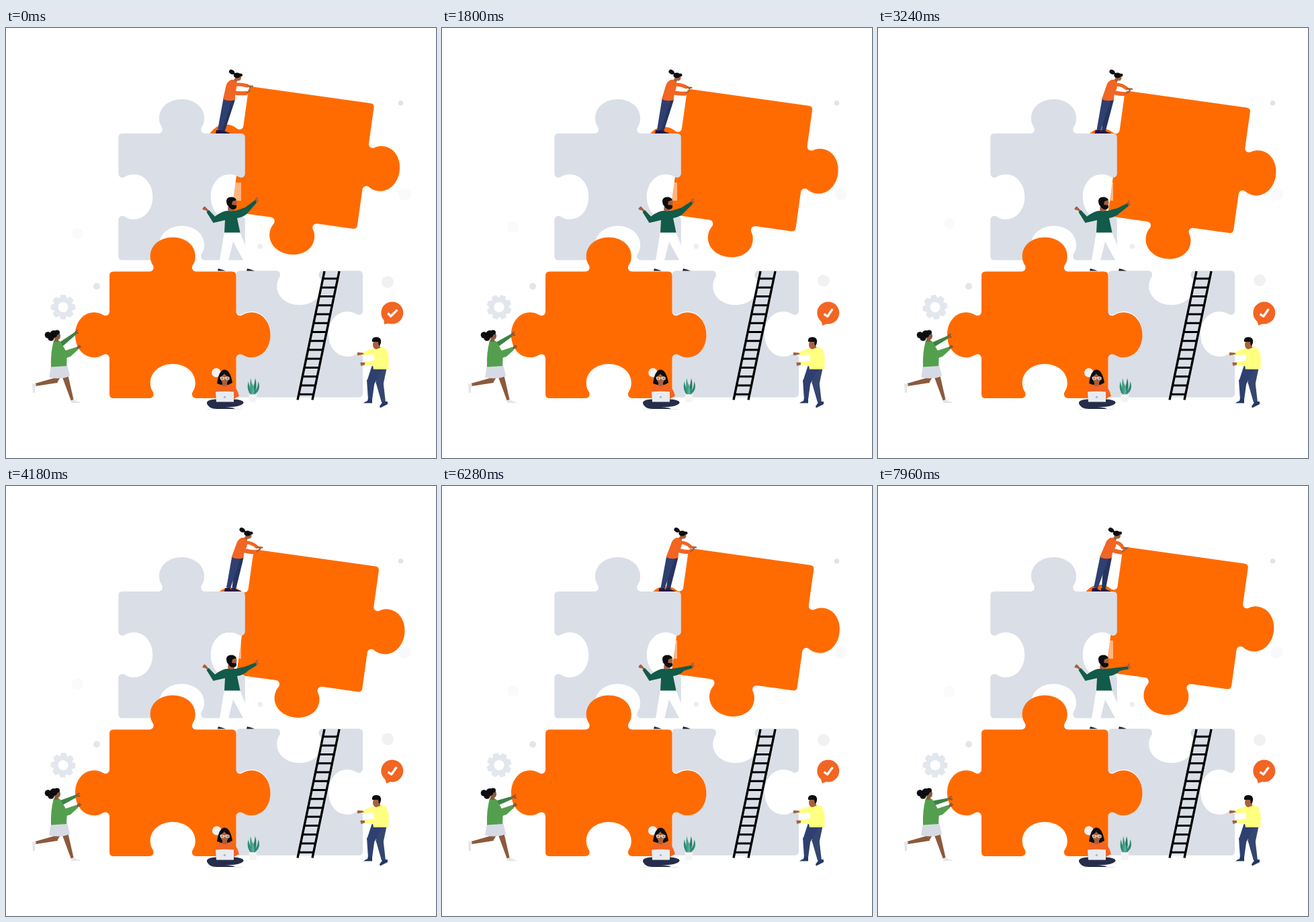
These frames come from a looping animation (640x640 px, 8 s). An HTML page with a canvas:

```html
<!DOCTYPE html>
<html lang="en">
<head>
<meta charset="utf-8">
<title>Puzzle team</title>
<style>
html, body { margin: 0; width: 100%; height: 100%; overflow: hidden; background: #fff; }
canvas { display: block; width: 100vmin; height: 100vmin; }
</style>
</head>
<body>
<canvas id="stage" width="640" height="640"></canvas>
<script>
const ctx = document.getElementById('stage').getContext('2d');
const LOOP = 8000;
const TIMES = [0, 680, 1800, 3240, 4400, 5160, 6280, 7960];
const ORANGE = '#ff6b00', GREY = '#dadee7', CORAL = '#f26522';
const NAVY = '#2f4070', DARK = '#1d2347', HAIR = '#0d0d10';
const SKIN = '#a5613e', BROWN = '#8b5a3c';

// Smooth curve through the values at TIMES
function at(t, values) {
  const last = TIMES.length - 1;
  let i = 0;
  while (i < last - 1 && t >= TIMES[i + 1]) i++;
  const slope = k => {
    const a = Math.max(k - 1, 0), b = Math.min(k + 1, last);
    return (values[b] - values[a]) / (TIMES[b] - TIMES[a]);
  };
  const span = TIMES[i + 1] - TIMES[i], u = (t - TIMES[i]) / span;
  const u2 = u * u, u3 = u2 * u;
  return (2 * u3 - 3 * u2 + 1) * values[i] + (3 * u2 - 2 * u3) * values[i + 1]
    + span * ((u3 - 2 * u2 + u) * slope(i) + (u3 - u2) * slope(i + 1));
}

function shape(color, path) {
  ctx.fillStyle = color;
  ctx.fill(new Path2D(path));
}

function oval(color, x, y, rx, ry = rx, turn = 0) {
  ctx.fillStyle = color;
  ctx.beginPath();
  ctx.ellipse(x, y, rx, ry, turn, 0, 7);
  ctx.fill();
}

function line(color, width, path, cap = 'round') {
  ctx.strokeStyle = color;
  ctx.lineWidth = width;
  ctx.lineCap = cap;
  ctx.lineJoin = 'round';
  ctx.stroke(new Path2D(path));
}

// Tapered limb between two points
function limb(color, x1, y1, w1, x2, y2, w2) {
  const len = Math.hypot(x2 - x1, y2 - y1);
  const nx = (y1 - y2) / len / 2, ny = (x2 - x1) / len / 2;
  shape(color, `M${x1 + nx * w1},${y1 + ny * w1}L${x2 + nx * w2},${y2 + ny * w2}
    L${x2 - nx * w2},${y2 - ny * w2}L${x1 - nx * w1},${y1 - ny * w1}Z`);
}

// Sides run top, right, bottom, left: 1 tab, -1 socket, 0 flat
function piece(color, x, y, sides, angle = 0) {
  const size = 188.5, c = size / 2, r = 6;
  ctx.save();
  ctx.translate(x, y);
  ctx.rotate(angle);
  ctx.beginPath();
  for (const s of sides) {
    ctx.lineTo(r, 0);
    if (s) {
      ctx.lineTo(c - 35, 0);
      ctx.bezierCurveTo(c - 29, 0, c - 27, -6 * s, c - 30, -10 * s);
      ctx.bezierCurveTo(c - 33, -15 * s, c - 33.5, -19 * s, c - 33.5, -23 * s);
      ctx.bezierCurveTo(c - 33.5, -39 * s, c - 19, -51 * s, c, -51 * s);
      ctx.bezierCurveTo(c + 19, -51 * s, c + 33.5, -39 * s, c + 33.5, -23 * s);
      ctx.bezierCurveTo(c + 33.5, -19 * s, c + 33, -15 * s, c + 30, -10 * s);
      ctx.bezierCurveTo(c + 27, -6 * s, c + 29, 0, c + 35, 0);
    }
    ctx.lineTo(size - r, 0);
    ctx.quadraticCurveTo(size, 0, size, r);
    ctx.translate(size, 0);
    ctx.rotate(Math.PI / 2);
  }
  ctx.fillStyle = color;
  ctx.fill();
  ctx.restore();
}

function dots(t) {
  oval('#e2e3e6', 587.5, 111.7, 3.7);
  oval('#f8f9fb', 593.5, 248, 9);
  oval('#eceef0', 378.3, 325, 3.8);
  oval('#f9fafb', 106, at(t, [306, 302, 296.5, 291, 296, 301, 305, 306]), 8.5);
  oval('#e5e6e9', 135, 384.5, 5);
  oval('#f1f1f2', 568, at(t, [378, 377, 376, 375.5, 377, 378, 378, 378]), 9);
}

function gear(t) {
  ctx.save();
  ctx.translate(85, 415.5);
  ctx.rotate(t * 0.0002);
  for (let i = 0; i < 8; i++) {
    shape('#e2e6ed', 'M-5.5,-12L-3.6,-18.3H3.6L5.5,-12Z');
    ctx.rotate(Math.PI / 4);
  }
  oval('#e2e6ed', 0, 0, 14.5);
  oval('#fff', 0, 0, 7.6);
  ctx.restore();
}

function checkBubble(t) {
  ctx.save();
  ctx.translate(574.8, 424);
  ctx.rotate(at(t, [0, -.14, -.19, -.18, -.17, -.16, -.15, -.15]));
  oval(CORAL, 0, 0, 16.5);
  shape(CORAL, 'M-12.5,9L-11.8,17L-3,15Z');
  line('#fff', 3.3, 'M-6.5,.5L-2,5L7.5,-4.5', 'butt');
  ctx.restore();
}

function climber(t) {
  const hip = at(t, [0, 1, 4, 10, 13, 12.5, 10.5, 7]);
  const top = at(t, [0, 1.5, 5.5, 12.5, 16, 16, 13.5, 11]);
  const back = at(t, [0, 1, 5, 10.5, 13.3, 13.3, 10.5, 6]);
  const front = at(t, [0, 1, 4.5, 13, 17, 17, 14, 13]);
  const hand = at(t, [0, 1.5, 4.5, 11, 15, 14.5, 11, 5]);
  const drop = at(t, [0, .8, 2, 4, 5, 5, 4.5, 5.5]);

  limb('#26345f', 335 + hip, 106, 12, 323 + front, 152, 6);
  limb(NAVY, 330 + hip, 106, 13, 318 + back, 152, 6);
  shape(DARK, `M${319 + front},152h6q2,3 8,4v1h-14Z`);
  shape('#20154b', `M${313 + back},152h7q2,3 8,4v1h-16Z`);

  shape(CORAL, `M${335 + top},77Q${329 + top},80 ${327.5 + top},86L${323 + hip},106
    Q${332 + hip},110 ${341 + hip},107Q${341 + hip},98 ${342.5 + top},91
    Q${345 + top},82 ${342 + top},77Z`);
  line(CORAL, 5, `M${340 + top},84.5Q${349 + top},83 ${359 + hand},${86 + drop}`);
  line(SKIN, 2.2, `M${360 + hand},${86 + drop}l7,.8m-5,.2l2,1.5`);
  line(CORAL, 6, `M${339 + top},96Q${346 + top},98 ${357 + hand},${97 + drop * .3}`);
  line(SKIN, 2.4, `M${359 + hand},${96 + drop * .3}l4,-3`);

  limb(SKIN, 341 + top, 79, 5, 345 + top, 73, 5);
  oval(SKIN, 346 + top, 74, 4, 4.5);
  oval(HAIR, 344 + top, 70.5, 5.2, 4);
  oval(HAIR, 349 + top, 70, 3, 2.3);
  oval(HAIR, 336 + top, 65.5, 4.3, 3.2, .5);
  line(HAIR, 2.5, `M${337 + top},66l5,3`);
}

function builder(t) {
  const y = at(t, [253, 253.3, 255, 258, 260.5, 262, 264, 265.5]);
  shape('#fff', 'M325,303H348L366,349L371,358H360L338,318L328,358H315L319,340Z');
  shape('#24222b', 'M316,358Q321,359 327,361.5H315Z');
  shape('#24222b', 'M359,358Q365,359 370,361.5H358Z');

  line(SKIN, 3, 'M301,273L295.5,267M298,270L294,269');
  line(SKIN, 2.8, `M370,${y + 6}L373.5,${y}M371,${y + 6}L374.5,${y + 4}`);
  shape('#125a49', `M330,272Q322,272 311,280.5L302,271L298.5,274L308.5,290
    L326,286L325,304.5H348.5L344,283Q355,281 360,275L373,${y + 7}L371,${y + 3}
    L356,${267 + (y - 253) * .25}L342,272Z`);

  shape(SKIN, 'M331,263H339L340,271Q335,275 330,271Z');
  oval(SKIN, 338.5, 260, 5, 7);
  shape(HAIR, 'M329,263Q326,254 332,252Q340,250 343,256L337,258L336,263L343,264Q344,269 339,270Q333,270 331,265Z');
}

function pusher(t) {
  const x = at(t, [106, 106, 107, 107.5, 108.5, 109, 109, 109]);
  const y = at(t, [450, 451, 453, 456, 458, 459, 460, 462.5]);
  limb(BROWN, 77, 518, 9, 73, 526, 7);
  limb(BROWN, 76, 524, 8, 44, 531, 4);
  limb(BROWN, 88, 518, 9, 99, 555, 4);
  shape('#e4e5e9', 'M39,529L45,530L43,536V543L40,543Z');
  shape('#e4e5e9', 'M97,554L101,553Q105,556 111,557V558H97Z');
  shape('#d6dae4', 'M67,502L91,501L95,518Q82,524 64,520Z');

  line(BROWN, 2.6, `M102,${y + 5}L${x},${y}m-3,3l4,1`);
  limb('#3d8343', 79, 473, 8, 104, y + 4, 4);
  shape('#549f4e', 'M71,465Q80,463 83,470L91,484L90,503L67,504.5Q66,484 71,465Z');
  line(BROWN, 2.8, 'M104,478L109,473M106,477L110.5,474.5');
  shape('#549f4e', 'M83,482L104,475L107,479L96,489L84,493Z');

  limb(BROWN, 75, 467, 6, 75, 460, 5);
  oval(BROWN, 76.5, 458.5, 4.5, 5.5);
  oval(HAIR, 71, 455.5, 5.5);
  oval(HAIR, 76, 453, 4, 3.5);
  oval(HAIR, 62.5, 457, 4.8);
  oval(HAIR, 67, 461, 4.8);
}

function helper() {
  limb('#35466f', 559, 506, 15, 556, 530, 11);
  limb('#35466f', 556, 527, 11, 562, 557, 6);
  limb(NAVY, 552, 506, 16, 543, 527, 12);
  limb(NAVY, 543, 524, 12, 542, 553, 6);
  shape('#243a63', 'M539,551L545,553V558.5H532Q534,556 538,555Z');
  shape('#243a63', 'M561,556L568,556V560L557,565.5L556,563Z');
  line('#e8eaee', 1, 'M533,559H545M557,566L568,560.5', 'butt');

  line(SKIN, 2.4, 'M534,485L524,484M529,485L524,486M537,499L528.5,499M534,500L529,501.5');
  shape('#ffff80', 'M548,476L531,482.5L533,487L548,486L548,495L534,497V501.5L546,502L547,508L569,508Q572,484 564,476Q556,473 548,476Z');
  limb(SKIN, 554, 477, 7, 552, 470, 7);
  oval(SKIN, 551, 471, 5, 7);
  shape(HAIR, 'M545,467Q544,460 551,460Q559,460 558,468Q557,473 555,473L554,467Z');
}

function typist(t) {
  oval('#f2f2f3', 313 + at(t, [0, 0, 1, .8, .7, .5, .7, .8]), 513, 6.8);
  shape(CORAL, 'M319,529Q311,534 309,547L315,552H339L347,548Q344,533 332,529Z');
  shape(HAIR, 'M314,529Q317,508 326,508.5Q334,510 337,528L331,531H320Z');
  limb(SKIN, 325.5, 524, 7, 325.5, 533, 7);
  oval(SKIN, 325.5, 521, 6, 8);
  shape(HAIR, 'M318,519Q319,510 326,510Q332,511 333,519Q326,518 325,514Q323,518 318,519Z');
  line('#f4f4f4', 1.1, 'M319,520h5v3h-4zM327,520h5v3h-4zM324,521h3', 'butt');
  shape('#c04a28', 'M323.5,527.5h4l-2,1.5Z');
  shape('#262d4a', 'M300,561Q296,555 307,553Q325,550 345,553Q356,555 353,559Q347,565 326,564Q345,566 339,567H313Q304,567 300,561Z');
  line('#e9ebef', 1.5, 'M300,567.5H312M339,567.5H351');
  shape('#e8ebf0', 'M312,541.5Q325,540 339,541.5V556.5H313Z');
  oval('#a9b2c2', 325.5, 549.3, 1.6);
}

function plant(t) {
  const sway = at(t, [0, 0, 0, 0, 0, 0, .2, 1]);
  const leaf = (color, x, y, bend) =>
    shape(color, `M365,546Q${x - 2 + bend},${y + 14} ${x},${y}Q${x + 4 + bend},${y + 13} 369,546Z`);
  leaf('#2e8b72', 360.5 + sway, 526, -1);
  leaf('#2e8b72', 375.5, 526, 1);
  leaf('#3f9c84', 364 + sway, 521, 0);
  leaf('#257a65', 371 - sway, 521, 0);
  leaf('#55ad94', 367.5, 529, 0);
  shape('#f4f4f5', 'M361.5,545H373.5L372.5,556Q367.5,558 362.5,556Z');
  line('#dfe1e5', 1, 'M361.5,545.5H373.5', 'butt');
}

function ladder() {
  for (let i = 0; i < 14; i++) {
    const y = 373 + i * 13.25, x = 474 - (y - 362) * .209;
    line('#000', 3, `M${x},${y}h22`, 'butt');
  }
  line('#000', 3.4, 'M474,362L434,553.5M496,362L456,553.5', 'butt');
}

function draw(t) {
  ctx.fillStyle = '#fff';
  ctx.fillRect(0, 0, 640, 640);
  dots(t);
  gear(t);
  const dx = at(t, [0, 1.1, 3.6, 6.3, 7.5, 7.3, 5.8, 3.2]);
  const dy = at(t, [0, 1.3, 3.8, 6.4, 7.6, 7.4, 5.7, 3.5]);
  piece(ORANGE, 361.6 + dx, 86.7 + dy, [0, 1, 1, 1], .139);
  shape('rgba(255,255,255,.5)', 'M335,230H350V257H335Z');
  piece(GREY, 167.3, 157, [1, -1, -1, -1]);
  climber(t);
  piece(GREY, 342.5, 361.3, [-1, -1, 0, -1]);
  piece(ORANGE, 154, 362.6, [1, 1, -1, 1]);
  builder(t);
  ladder();
  checkBubble(t);
  pusher(t);
  helper();
  plant(t);
  typist(t);
}

function tick() {
  draw(performance.now() % LOOP);
  requestAnimationFrame(tick);
}
tick();
</script>
</body>
</html>
```
